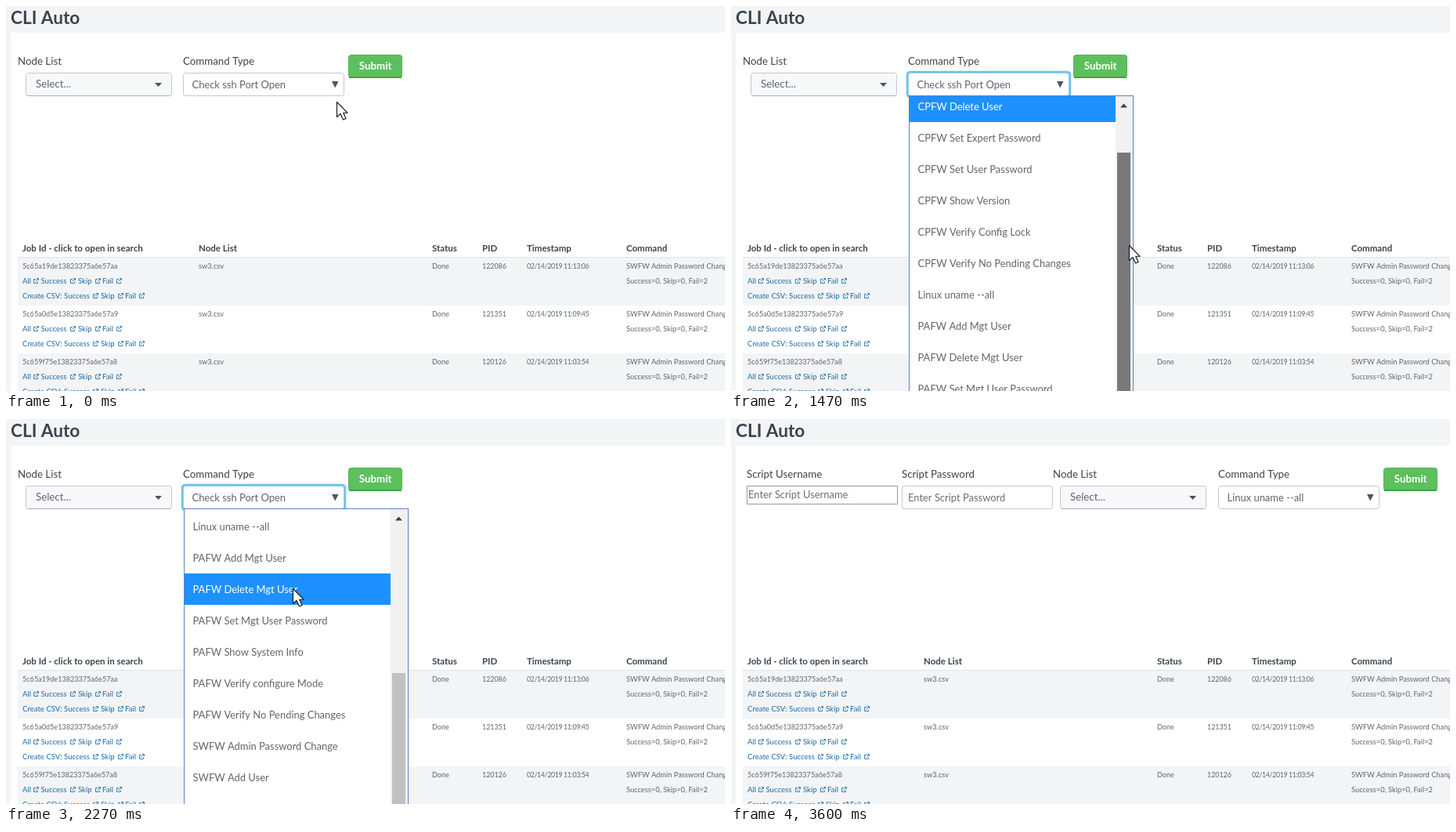
Recreate the animation shown at these times as an HTML page with a canvas. Size 918 by 491 pixels, loop 3.74 s.

```html
<!DOCTYPE html>
<html lang="en">
<head>
<meta charset="utf-8">
<title>CLI Auto</title>
<style>
html, body { margin: 0; width: 100%; height: 100%; overflow: hidden; background: #f2f4f5; }
canvas { display: block; }
</style>
</head>
<body>
<canvas id="stage" width="918" height="491"></canvas>
<script>
const ctx = document.getElementById('stage').getContext('2d');
const W = 918, H = 491, LOOP = 3740, TICK = 200 / 3;
const DARK = '#3c444d', GRAY = '#60666c', LINK = '#1c6ca8', PALE = '#f2f4f5', EDGE = '#c0c8d0';
const BODY = 12.95;
const LIST_TOP = 115, ROW = 40, THUMB_TOP = 136, THUMB_LEN = 332, RATIO = 1.692;

const commands = [
  'Check ssh Port Open', 'CPFW Add User', 'CPFW Delete User', 'CPFW Set Expert Password',
  'CPFW Set User Password', 'CPFW Show Version', 'CPFW Verify Config Lock',
  'CPFW Verify No Pending Changes', 'Linux uname --all', 'PAFW Add Mgt User',
  'PAFW Delete Mgt User', 'PAFW Set Mgt User Password', 'PAFW Show System Info',
  'PAFW Verify configure Mode', 'PAFW Verify No Pending Changes',
  'SWFW Admin Password Change', 'SWFW Add User', 'SWFW Delete User'
];
const jobs = [
  ['5c65a19de13823375a6e57aa', '122086', '02/14/2019 11:13:06'],
  ['5c65a0d5e13823375a6e57a9', '121351', '02/14/2019 11:09:45'],
  ['5c659f75e13823375a6e57a8', '120126', '02/14/2019 11:03:54']
];

// [tick, value...]
const pointerPath = [
  [0, 422, 122], [1, 419, 116], [2, 415, 97], [8, 415, 97], [9, 418, 104], [11, 440, 142],
  [14, 485, 202], [15, 492, 197], [16, 494, 194], [18, 495, 194], [19, 498, 215],
  [22, 508, 305], [24, 518, 360], [26, 522, 382], [27, 519, 380], [31, 410, 282],
  [34, 366, 216], [37, 330, 155], [39, 315, 133], [42, 315, 133], [43, 300, 152],
  [48, 67, 470], [49, 55, 500]
];
const thumbPath = [[20, 0], [22, 51.4], [24, 111], [26, 188]];

function along(path, k) {
  if (k <= path[0][0]) return path[0].slice(1);
  for (let i = 1; i < path.length; i++) {
    const [a, ...from] = path[i - 1], [b, ...to] = path[i];
    if (k <= b) return from.map((v, j) => v + (to[j] - v) * (k - a) / (b - a));
  }
  return path[path.length - 1].slice(1);
}

function rect(x, y, w, h, color) {
  ctx.fillStyle = color;
  ctx.fillRect(x, y, w, h);
}

function text(str, x, cy, size, color, weight = 400, spacing = 0) {
  ctx.font = `${weight} ${size}px Lato, "Open Sans", sans-serif`;
  ctx.letterSpacing = spacing + 'px';
  ctx.fillStyle = color;
  ctx.fillText(str, x, cy + size * 0.36);
}

function box(x, y, w, h, r, fill, stroke) {
  ctx.beginPath();
  ctx.roundRect(x + .5, y + .5, w - 1, h - 1, r);
  ctx.fillStyle = fill;
  ctx.fill();
  ctx.strokeStyle = stroke;
  ctx.lineWidth = 1;
  ctx.stroke();
}

function shape(points, fill) {
  ctx.beginPath();
  points.forEach(([x, y]) => ctx.lineTo(x, y));
  ctx.closePath();
  ctx.fillStyle = fill;
  ctx.fill();
}

const label = (str, x) => text(str, x, 70, 13.3, DARK);

function nodePicker(x) {
  box(x, 85, 187, 30, 3, '#f7f8fa', EDGE);
  rect(x + 2, 114, 183, 1, '#a9b2bb');
  text('Select...', x + 13, 99, 13.3, GRAY);
  shape([[x + 165, 98], [x + 174, 98], [x + 169.5, 103]], '#4c545c');
}

function commandPicker(x, value, focused) {
  if (focused) {
    box(x - 3, 82, 212, 36, 5, '#dff1fc', '#dff1fc');
    box(x - 2, 83, 210, 34, 4, '#6cc2f2', '#6cc2f2');
  }
  box(x, 85, 206, 30, 3, '#fff', focused ? '#9fc9e2' : EDGE);
  text(value, x + 11.5, 100, BODY, GRAY);
  shape([[x + 190, 96], [x + 198.5, 96], [x + 194.2, 104.5]], '#50565c');
}

function submitButton(x) {
  box(x, 62, 69, 30, 3, '#5cc05c', '#53b653');
  rect(x + 1, 90, 67, 2, '#45a047');
  text('Submit', x + 13.8, 76, 13.3, '#fff', 700);
}

function openIcon(x, cy) {
  ctx.strokeStyle = LINK;
  ctx.lineWidth = .85;
  ctx.beginPath();
  ctx.moveTo(x + 3, cy - 2.5);
  ctx.lineTo(x + .5, cy - 2.5);
  ctx.lineTo(x + .5, cy + 2.5);
  ctx.lineTo(x + 5.5, cy + 2.5);
  ctx.lineTo(x + 5.5, cy + .5);
  ctx.moveTo(x + 2.5, cy + .5);
  ctx.lineTo(x + 6, cy - 3);
  ctx.moveTo(x + 4, cy - 3.5);
  ctx.lineTo(x + 6.5, cy - 3.5);
  ctx.lineTo(x + 6.5, cy - 1);
  ctx.stroke();
}

function link(str, x, cy, iconX) {
  text(str, x, cy, 9.6, LINK);
  openIcon(iconX, cy);
}

function jobRow([id, pid, stamp], i) {
  const y = 321 + i * 61;
  if (i % 2 === 0) rect(15, y, W - 15, 61, PALE);
  text(id, 21, y + 11, 9.1, GRAY);
  text('sw3.csv', 246, y + 11, 9.3, GRAY);
  text('Done', 544, y + 11, 9.1, GRAY);
  text(pid, 608, y + 11, 8.9, GRAY);
  text(stamp, 665, y + 11, 8.7, GRAY, 400, -.3);
  text('SWFW Admin Password Change', 792, y + 11, 9.3, GRAY);
  text('Success=0, Skip=0, Fail=2', 792, y + 30, 9.3, GRAY);
  link('All', 21, y + 30, 35);
  link('Success', 44.5, y + 30, 82);
  link('Skip', 92, y + 30, 114);
  link('Fail', 123, y + 30, 141);
  link('Create CSV: Success', 21, y + 49, 111);
  link('Skip', 121, y + 49, 143);
  link('Fail', 152, y + 49, 170);
}

function page(k) {
  rect(0, 0, W, H, PALE);
  rect(6, 34, W - 6, H - 34, '#fff');
  text('CLI Auto', 6, 14.5, 22.6, DARK, 700);

  const chosen = k >= 42, shift = chosen ? 396 : 0;
  if (chosen) {
    label('Script Username', 20);
    box(20, 85, 193, 24, 0, '#fff', '#9a9a9a');
    text('Enter Script Username', 22, 96, BODY, '#6b7178');
    label('Script Password', 218);
    box(218, 85, 193, 30, 3, '#fff', EDGE);
    text('Enter Script Password', 226, 100, BODY, '#6b7178');
  }
  label('Node List', 15 + shift);
  nodePicker(chosen ? 420 : 25);
  label('Command Type', 226 + shift);
  commandPicker(226 + shift, commands[chosen ? 8 : 0], k >= 6 && k < 54);
  submitButton(437 + shift);

  const heads = [['Job Id - click to open in search', 21], ['Node List', 246], ['Status', 544],
    ['PID', 608], ['Timestamp', 665], ['Command', 792]];
  heads.forEach(([str, x]) => text(str, x, 308.5, 11.5, DARK, 700));
  rect(15, 320, W - 15, 1, '#dfe3e7');
  jobs.forEach(jobRow);
  if (k >= 48 && k < 50) rect(44, 477, 35, 1, LINK);
}

function activeRow(k, x, y, scroll) {
  if (k < 9) return 0;
  if (k > 14 && (k < 27 || x > 491)) return 2;
  return Math.max(0, Math.floor((y - LIST_TOP + scroll) / ROW));
}

function dropdown(k, x, y) {
  const [offset] = along(thumbPath, k);
  const scroll = Math.round(offset * RATIO);
  const active = activeRow(k, x, y, scroll);
  rect(227, 114, 287, H, '#5c83c4');
  rect(228, LIST_TOP, 285, H, '#fff');
  ctx.save();
  ctx.beginPath();
  ctx.rect(228, LIST_TOP, 263, H);
  ctx.clip();
  commands.forEach((str, i) => {
    const top = LIST_TOP + i * ROW - scroll;
    if (i === active) rect(228, top, 263, ROW, '#1e90ff');
    text(str, 238.5, top + 20, BODY, i === active ? '#fff' : GRAY);
  });
  ctx.restore();
  rect(491, LIST_TOP, 22, H, '#f1f1f1');
  shape([[497, 129.5], [506, 129.5], [501.5, 124.5]], offset ? '#404040' : '#a3a3a3');
  const dragging = k >= 19 && k < 27;
  const hovering = k >= 15 && k < 19;
  rect(493, THUMB_TOP + Math.round(offset), 17, THUMB_LEN,
    dragging ? '#787878' : hovering ? '#a8a8a8' : '#c1c1c1');
}

function outlined(path) {
  ctx.lineJoin = 'round';
  ctx.lineWidth = 1.1;
  ctx.fillStyle = '#fff';
  ctx.strokeStyle = '#111';
  ctx.fill(path);
  ctx.stroke(path);
}

const arrow = new Path2D('M.5 .5V19.5L5 15.5L8.5 23L12 21.5L8.7 14.3H14.2Z');
const hand = new Path2D('M-2.5 14V2Q-2.5 0 0 0Q2.5 0 2.5 2V9Q5 7 6.5 9.5Q9 8 10 10.5' +
  'Q13 9.5 13 13V19Q13 22 10.5 25V28H-2V25Q-5 22 -9 16Q-10 13 -7.5 12.5Q-5 12.5 -2.5 16Z');

function pointer(k, x, y) {
  ctx.save();
  ctx.translate(Math.round(x), Math.round(y));
  if ((k >= 2 && k <= 9) || k === 48) {
    outlined(hand);
    ctx.lineWidth = 1;
    ctx.stroke(new Path2D('M2.5 9V14M6.5 10V14.5M10 11V15'));
  } else {
    outlined(arrow);
  }
  ctx.restore();
}

function draw(ms) {
  const k = Math.floor((ms % LOOP + 4) / TICK);
  const [x, y] = along(pointerPath, k);
  ctx.clearRect(0, 0, W, H);
  page(k);
  if (k >= 6 && k < 42) dropdown(k, x, y);
  if (k < 49) pointer(k, x, y);
}

let start;
function loop(now) {
  start ??= now;
  draw(now - start);
  requestAnimationFrame(loop);
}
draw(0);
requestAnimationFrame(loop);
</script>
</body>
</html>
```
